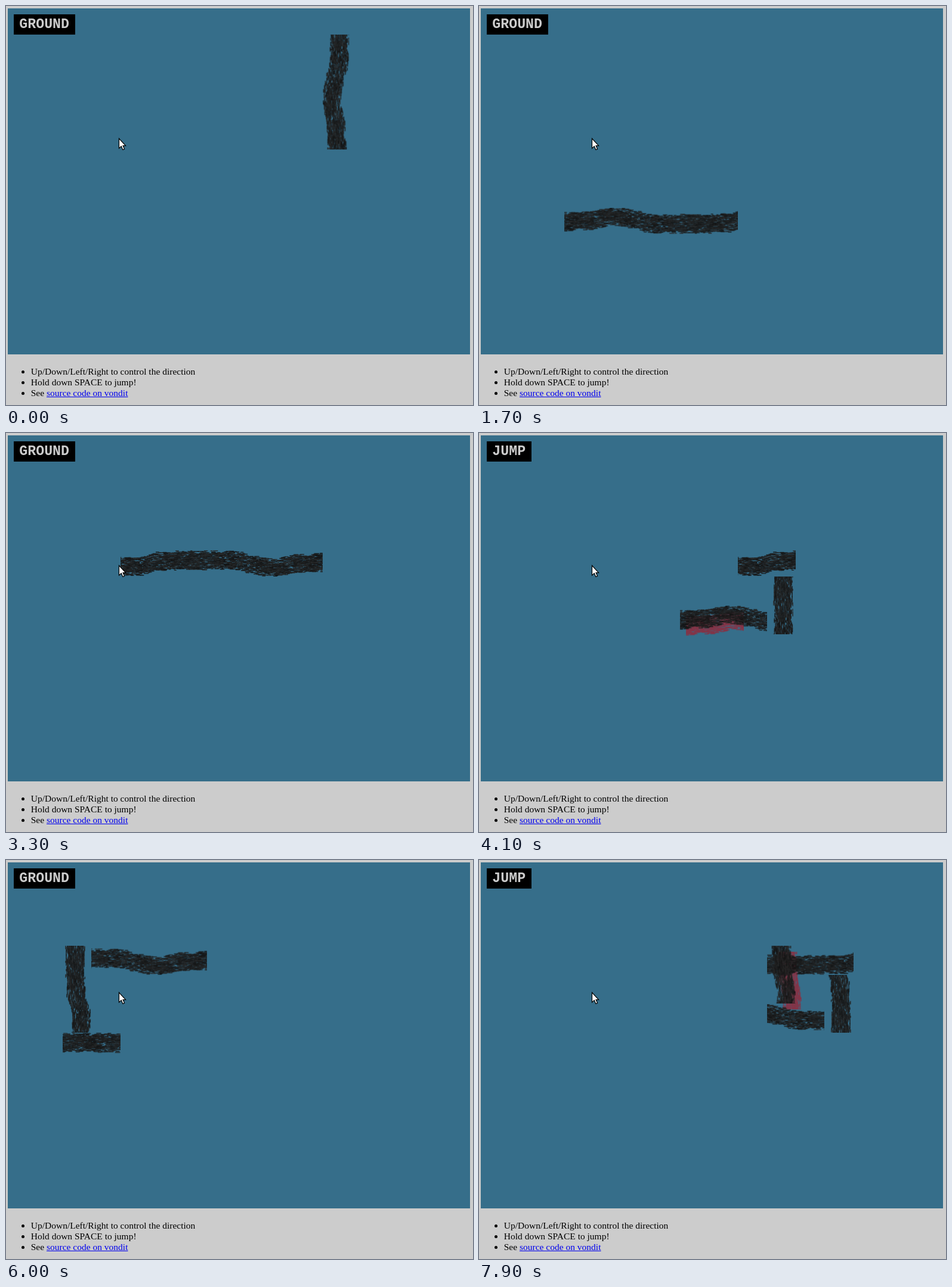
Animation of 783x670 px, one loop 8 s. Source, as an HTML page with a canvas:

```html
<!DOCTYPE html>
<html lang="en">
<head>
<meta charset="utf-8">
<title>Brush snake</title>
<style>
  html, body { margin: 0; width: 100%; height: 100%; overflow: hidden; background: #ccc; }
  body { position: relative; font: 15.5px/18px "Liberation Serif", serif; color: #000; }
  canvas, svg, #label, ul { position: absolute; }
  canvas { left: 3px; top: 4px; background: #366e8a; }
  #label {
    left: 12.6px; top: 13.6px; height: 34.8px; padding: 0 9.7px;
    background: #000; color: #ccc;
    font: bold 23.25px/34.8px "Liberation Mono", monospace;
  }
  ul { left: 3px; top: 605px; margin: 0; padding-left: 38.75px; white-space: nowrap; }
  .link { color: #00e; text-decoration: underline; }
  svg { left: 188px; top: 221px; }
</style>
</head>
<body>
<canvas id="stage" width="775" height="581"></canvas>
<div id="label">GROUND</div>
<ul>
  <li>Up/Down/Left/Right to control the direction</li>
  <li>Hold down SPACE to jump!</li>
  <li>See <span class="link">source code on vondit</span></li>
</ul>
<svg width="16" height="24">
  <path d="M1.5 1.5V18L5.3 14.6L7.9 20.4L10.6 19.2L8.1 13.6H12.6Z" fill="#fff" stroke="#000" stroke-width="1.2"/>
</svg>
<script>
const CELL = 48.4375, LENGTH = 9 * CELL, LOOP = 8000;
const ctx = document.getElementById('stage').getContext('2d');
const label = document.getElementById('label');

let seed = 7;
const random = () => (seed = seed * 16807 % 2147483647) / 2147483647;

// Sideways drift of the brush stroke: [distance from head, offset to the left].
const DRIFT = [[0, 1], [40, -2], [82, -7.5], [108, -5.5], [146, 4.5], [190, 4],
               [240, 4], [275, 2], [312, -6], [345, -7], [440, -6]];

function drift(d) {
  const i = Math.max(1, DRIFT.findIndex(p => p[0] >= d));
  const [d0, a] = DRIFT[i - 1], [d1, b] = DRIFT[i];
  const s = Math.min(1, Math.max(0, (d - d0) / (d1 - d0)));
  return a + (b - a) * s * s * (3 - 2 * s);
}

function newCanvas() {
  const c = document.createElement('canvas');
  c.width = Math.ceil(LENGTH);
  c.height = 50;
  return c;
}

// One long dry-brush stroke with the head at its right end.
function paintBrush() {
  const c = newCanvas(), g = c.getContext('2d');
  for (let v = -16; v <= 16; v++) {
    for (let d = -4; d < LENGTH;) {
      const len = 2 + random() * 6;
      const patch = 0.1 * Math.sin(d / 17 + v * 0.35) * Math.sin(d / 29 - v * 0.2);
      const ink = 0.84 + patch - 0.7 * Math.abs(v / 16) ** 7;
      if (random() < ink) {
        const tone = 18 + random() * 24 | 0;
        g.fillStyle = `rgba(${tone},${tone},${tone},.92)`;
        g.fillRect(LENGTH - d - len, 24.2 - drift(d + len / 2) + v, len + 0.8, 1.5);
      }
      d += len * 0.9;
    }
  }
  return c;
}

function tint(source, color) {
  const c = newCanvas(), g = c.getContext('2d');
  g.drawImage(source, 0, 0);
  g.globalCompositeOperation = 'source-in';
  g.fillStyle = color;
  g.fillRect(0, 0, c.width, c.height);
  return c;
}

const brush = paintBrush();
const shadow = tint(brush, 'rgba(140,46,64,.93)');

// The route as runs of cells; each entry remembers the direction it was entered in.
const STEP = { R: [1, 0], D: [0, 1], L: [-1, 0], U: [0, -1] };
const START = 3;
const path = [{ x: 11, y: 1, angle: Math.PI / 2 }];
for (const run of 'D6 L8 U3 R7 D2 L8 U3 R10 D2 L2 U2'.split(' ')) {
  const [dx, dy] = STEP[run[0]];
  for (let n = +run.slice(1); n--;) {
    const last = path[path.length - 1];
    path.push({ x: last.x + dx, y: last.y + dy, angle: Math.atan2(dy, dx) });
  }
}

// Duration of each move in tenths of a second.
const HOLDS = '212121122121212212121221221221212212121221221211221';
const starts = [];
let clock = 0;
for (const h of HOLDS) {
  starts.push(clock);
  clock += h * 100;
}

const GROWTH = [3, 6, 18, 30, 38];
const SPAWN = 6;
const airborne = t => t >= 3800 && t < 4300 || t >= 7600;

function drawPart(image, part, shift) {
  ctx.save();
  ctx.translate(part.px + shift, part.py + shift);
  ctx.rotate(part.angle);
  ctx.drawImage(image, LENGTH - (part.index + 1) * CELL, 0, CELL, 48,
                -CELL / 2, -24.2, CELL, 48);
  ctx.restore();
}

function bodyAt(move) {
  const size = 4 + GROWTH.filter(m => m <= move).length;
  const parts = [];
  for (let index = 0; index < size; index++) {
    const at = move + START - index, cell = path[at];
    const part = {
      index, angle: cell.angle,
      px: 19.4 + cell.x * CELL, py: 19.4 + cell.y * CELL,
      jumped: airborne(starts[at - START])
    };
    // A new tail appears in the corner, then faces along its way to the snake.
    if (index === 5 && move === SPAWN) Object.assign(part, { px: 0, py: 0, angle: 0 });
    if (index === 5 && move === SPAWN + 1) part.angle = Math.atan2(part.py, part.px);
    parts.push(part);
  }
  return parts;
}

let shownMove = -1;
function render(now) {
  const t = now % LOOP;
  const text = airborne(t) ? 'JUMP' : 'GROUND';
  if (label.textContent !== text) label.textContent = text;
  const move = starts.filter(s => s <= t).length - 1;
  if (move !== shownMove) {
    shownMove = move;
    const parts = bodyAt(move);
    ctx.clearRect(0, 0, 775, 581);
    parts.filter(p => p.jumped).forEach(p => drawPart(shadow, p, 10));
    parts.reverse().forEach(p => drawPart(brush, p, 0));
  }
}

let origin;
function tick(now) {
  origin ??= now;
  render(Math.max(0, now - origin));
  requestAnimationFrame(tick);
}
render(0);
requestAnimationFrame(tick);
</script>
</body>
</html>
```
